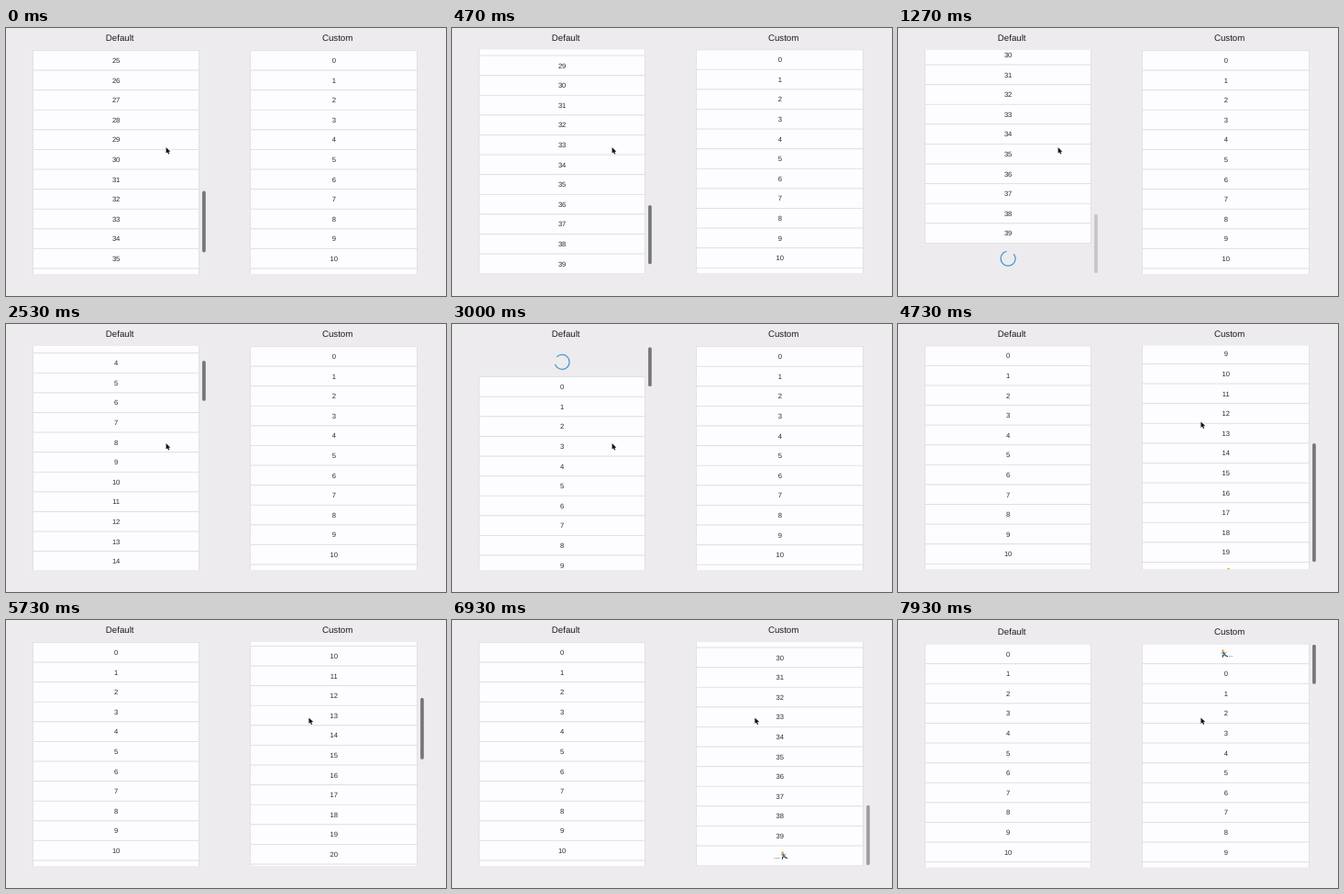
Animation of 480x292 px, one loop 8000 ms. Source, as an HTML page with a canvas:

```html
<!DOCTYPE html>
<html lang="en">
<head>
<meta charset="utf-8">
<title>Scrolling lists</title>
<style>
html, body { margin: 0; width: 100%; height: 100%; overflow: hidden; background: #edebee; }
canvas { display: block; width: 480px; height: 292px; }
</style>
</head>
<body>
<canvas id="stage"></canvas>
<script>
// Times are in ticks, 15 per second
const LOOP = 8000, TICK = 1000 / 15, LOAD_TIME = 15;
const ROW = 21.6, SPINNER_ROW = 33, TOP = 24, VIEW = 244;
const FONT = '"Liberation Sans", Arial, sans-serif';

const canvas = document.getElementById('stage');
const ctx = canvas.getContext('2d');
const dpr = window.devicePixelRatio || 1;
canvas.width = 480 * dpr;
canvas.height = 292 * dpr;
ctx.textRendering = 'geometricPrecision';

// The page springs back after a list hits its end
const bounces = [
  { start: 4, length: 9, size: -1.7 },
  { start: 39, length: 8, size: 3 },
  { start: 70, length: 3, size: -1.5 },
  { start: 95, length: 4, size: -.8 },
  { start: 117, length: 6, size: 3.7 }
];

const lists = [
  {
    title: 'Default', titleX: 124.2, x: 29.5, w: 181, textX: 120.1, barX: 214.1,
    scrollFrom: 540, rowsFrom: 40,
    moves: [{ start: 0, end: 5, by: 80 }, { start: 7, end: 14, by: 34 }, { start: 34, end: 39.11, by: -654 }],
    barShown: [[-2, 17], [29, 47]],
    endLoads: [7], startLoads: [39],
    loaderH: SPINNER_ROW, loader: spinner
  },
  {
    title: 'Custom', titleX: 361.6, x: 266.5, w: 182, textX: 357.8, barX: 452.1,
    scrollFrom: 0, rowsFrom: 20,
    moves: [{ start: 66, end: 72, by: 212 }, { start: 91, end: 98, by: 430.4 }, { start: 114, end: 117, by: -642.4 }],
    barShown: [[66, 78], [84, 103], [114, 120]],
    endLoads: [70, 95], startLoads: [117],
    loaderH: ROW, loader: runnerRow
  }
];

const clamp = p => Math.max(0, Math.min(1, p));
const ramp = (n, from, to) => clamp((n - from) / (to - from));
const smooth = p => p * p * (3 - 2 * p);
const sum = (items, value) => items.reduce((total, item) => total + value(item), 0);
const loading = (starts, n) => starts.some(s => n >= s && n < s + LOAD_TIME);

const pageShift = n => sum(bounces, b =>
  n < b.start ? 0 : b.size * (1 - ramp(n, b.start, b.start + b.length)) ** 2);
const scrollAt = (list, n) => list.scrollFrom + sum(list.moves, m => m.by * smooth(ramp(n, m.start, m.end)));
const rowsAt = (list, n) => list.rowsFrom + 20 * list.endLoads.filter(s => n >= s + LOAD_TIME).length;
const barAlpha = (list, n) => sum(list.barShown, ([show, hide]) =>
  Math.min(ramp(n, show, show + 2), 1 - ramp(n, hide, hide + 3)));

function text(str, x, y, size, align = 'center') {
  ctx.font = size + 'px ' + FONT;
  ctx.textAlign = align;
  ctx.fillText(str, x, y);
}

function rowBox({ x, w }, y) {
  const edge = .4;
  ctx.fillStyle = '#dfdde1';
  ctx.fillRect(x - edge, y - edge, w + 2 * edge, ROW + 2 * edge);
  ctx.fillStyle = '#fdfcfe';
  ctx.fillRect(x + edge, y + edge, w - 2 * edge, ROW - 2 * edge);
  ctx.fillStyle = '#29282b';
}

function spinner(list, y, n) {
  const start = -.7 + (n - 19) / 15 * Math.PI * 2;
  ctx.strokeStyle = '#459bd2';
  ctx.lineWidth = 1.3;
  ctx.beginPath();
  ctx.arc(list.textX, y + SPINNER_ROW / 2 + .2, 8, start, start + 5.2);
  ctx.stroke();
}

function limb(color, width, points) {
  ctx.strokeStyle = color;
  ctx.lineWidth = width;
  ctx.beginPath();
  for (const [x, y] of points) ctx.lineTo(x, y);
  ctx.stroke();
}

function runner(x, y) {
  ctx.save();
  ctx.translate(x, y);
  ctx.lineCap = ctx.lineJoin = 'round';
  limb('#e9a23b', 1, [[.8, 4], [2.5, 3.2], [5.3, 3.6], [6.4, 2.8]]);
  limb('#2b3440', 1.2, [[4.2, 5], [2.6, 6.3], [2.4, 7.8]]);
  limb('#2b3440', 1.2, [[4.4, 5], [5.8, 6.6], [7.4, 7.2]]);
  limb('#2580bd', 2.2, [[3.2, 3.2], [4.3, 4.9]]);
  ctx.fillStyle = '#efad35';
  ctx.beginPath();
  ctx.arc(2.6, 1.3, 1.4, 0, 7);
  ctx.fill();
  ctx.restore();
}

function runnerRow(list, y, n, first) {
  rowBox(list, y);
  text('...', list.textX + (first ? .8 : -6.8), y + 13.5, 7.8, 'left');
  runner(list.textX + (first ? -6 : .2), y + 6.2);
}

function drawList(list, n) {
  const scroll = scrollAt(list, n), count = rowsAt(list, n);
  const first = loading(list.startLoads, n), last = loading(list.endLoads, n);
  const height = count * ROW + (first || last ? list.loaderH : 0);
  let y = TOP + .5 - scroll;

  ctx.fillStyle = '#1c1b1e';
  text(list.title, list.titleX, 14.3, 9.7);

  ctx.save();
  ctx.beginPath();
  ctx.rect(list.x - 1, TOP, list.w + 2, VIEW);
  ctx.clip();
  if (first) {
    list.loader(list, y, n, true);
    y += list.loaderH;
  }
  for (let i = 0; i < count; i++, y += ROW) {
    rowBox(list, y);
    text(i, list.textX, y + 13.5, 7.6);
  }
  if (last) list.loader(list, y, n, false);
  ctx.restore();

  const scale = VIEW / height;
  ctx.fillStyle = `rgba(0, 0, 0, ${.5 * barAlpha(list, n)})`;
  ctx.beginPath();
  ctx.roundRect(list.barX, TOP + 1 + Math.min(scroll, height - VIEW) * scale, 3.7, VIEW * scale - 2, 1.85);
  ctx.fill();
}

function drawCursor(n) {
  const p = ramp(n, 58, 61) ** 2.3;
  const shape = [[0, 0], [0, 8.2], [1.9, 6.5], [3.2, 9.5], [4.6, 8.9], [3.4, 6], [5.9, 5.8]];
  ctx.save();
  ctx.translate(174.6 + 155.8 * p, 130 - 23.6 * p);
  ctx.scale(.8, .8);
  ctx.beginPath();
  for (const [x, y] of shape) ctx.lineTo(x, y);
  ctx.closePath();
  ctx.strokeStyle = '#fff';
  ctx.stroke();
  ctx.fillStyle = '#111';
  ctx.fill();
  ctx.restore();
}

function draw(now) {
  const n = Math.floor((now % LOOP + 4) / TICK) % 120;
  ctx.setTransform(dpr, 0, 0, dpr, 0, 0);
  ctx.fillStyle = '#edebee';
  ctx.fillRect(0, 0, 480, 292);
  ctx.save();
  ctx.translate(0, pageShift(n));
  for (const list of lists) drawList(list, n);
  ctx.restore();
  drawCursor(n);
}

const start = performance.now();
function loop() {
  draw(performance.now() - start);
  requestAnimationFrame(loop);
}
loop();
</script>
</body>
</html>
```
